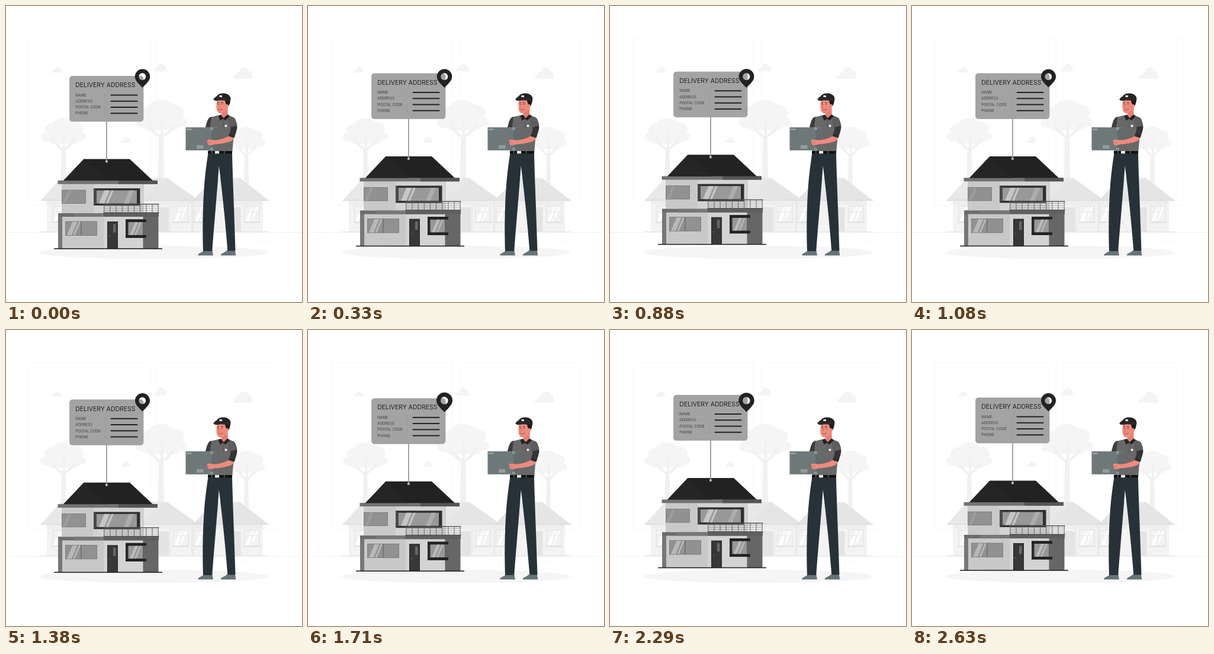
Write an HTML page that moves like this. It is 500 px wide and 500 px high and loops after 2680 ms.

```html
<!DOCTYPE html>
<html lang="en">
<head>
<meta charset="utf-8">
<title>Delivery address</title>
<style>
html, body { margin: 0; width: 100%; height: 100%; overflow: hidden; background: #fff; }
svg { display: block; width: 100%; height: 100%; }
text { font-family: Inter, "Open Sans", sans-serif; fill: #222; }
.label { font-size: 6.2px; font-weight: 300; }
</style>
</head>
<body>
<svg id="stage" viewBox="0 0 500 500"></svg>
<script>
const LOOP = 2680, FRAME = 1000 / 24, LAST = 63;
const PERIOD = 1500, LEAD = 38, LIFT = 10, SWELL = 0.1;
const PIN_X = 230.5, PIN_Y = 122.2;

const rect = (x, y, w, h, fill, more = '') =>
  `<rect x="${x}" y="${y}" width="${w}" height="${h}" fill="${fill}" ${more}/>`;
const path = (d, fill, more = '') => `<path d="${d}" fill="${fill}" ${more}/>`;
const line = (d, color, width, more = '') =>
  path(d, 'none', `stroke="${color}" stroke-width="${width}" ${more}`);
const dot = (x, y, r, fill) => `<circle cx="${x}" cy="${y}" r="${r}" fill="${fill}"/>`;
const round = 'stroke-linecap="round" stroke-linejoin="round"';

// Slanted reflection on a glass pane
const shine = (x, y, w, h, fill = '#c6c6c6') =>
  path(`M${x} ${y + h}l${h * 0.42} ${-h}h${w}l${-h * 0.42} ${h}z`, fill);

function cloud(x, y, w, h) {
  const p = (u, v) => `${(x + u * w).toFixed(1)} ${(y + v * h).toFixed(1)}`;
  return path(`M${p(.05, 1)}C${p(-.04, .9)} ${p(.02, .6)} ${p(.2, .65)}` +
    `C${p(.18, .4)} ${p(.28, .38)} ${p(.34, .42)}C${p(.34, -.1)} ${p(.76, -.1)} ${p(.8, .35)}` +
    `C${p(.95, .3)} ${p(1.02, .55)} ${p(.94, .66)}C${p(1.04, .7)} ${p(1.02, 1)} ${p(.92, 1)}Z`, '#f4f4f4');
}

// Crown from overlapping blobs around a forked trunk
function tree(cx, top, w, h, foot, trunk) {
  const blobs = [[0, .32, .27], [-.22, .43, .2], [.22, .4, .22], [-.36, .7, .14],
    [.37, .68, .13], [-.17, .72, .2], [.18, .72, .2], [0, .7, .2]];
  const crown = blobs.map(([u, v, r]) =>
    `<ellipse cx="${cx + u * w}" cy="${top + v * h}" rx="${r * w}" ry="${Math.min(r * w * .72, h * .34)}" fill="#f5f5f5"/>`).join('');
  const fork = top + h;
  return crown + path(`M${cx - trunk} ${foot}L${cx - trunk * .7} ${fork + 4}L${cx + trunk * .7} ${fork + 4}L${cx + trunk} ${foot}Z`, '#f1f1f1') +
    line(`M${cx - w * .24} ${fork - h * .27}Q${cx - w * .2} ${fork - 2} ${cx - 1} ${fork + 8}` +
      `M${cx + w * .25} ${fork - h * .25}Q${cx + w * .2} ${fork - 2} ${cx + 1} ${fork + 8}` +
      `M${cx + 1} ${fork + 8}V${fork - h * .42}`, '#f1f1f1', trunk * .75, 'stroke-linecap="round"');
}

function paleWindow(x, w) {
  return rect(x, 337, w, 29, '#e6e6e6') + rect(x + 1.5, 338.5, w - 3, 25.5, '#f2f2f2') +
    shine(x + 2, 339, w * .2, 25, '#fff') + shine(x + w * .38, 339, w * .13, 25, '#fff') +
    line(`M${x + w / 2} 338v26M${x} 347.5h${w}`, '#e9e9e9', 1) + rect(x - 1, 364.5, w + 2, 2, '#e2e2e2');
}

function backdrop() {
  const frame = x => `<rect x="${x}" y="55" width="204" height="282" rx="2" fill="none" stroke="#f5f5f5" stroke-width=".7"/>`;
  const dashes = [[416.8, 398.5, 33], [322.5, 401.2, 8.7], [396.6, 389.2, 19.2],
    [52.5, 390.9, 43], [104.6, 390.9, 6.3], [131.5, 395.1, 94]];
  return frame(39) + frame(255) +
    rect(0, 382, 500, .6, '#eaeaea') +
    dashes.map(([x, y, w]) => rect(x, y, w, .3, '#ebebeb')).join('') +
    cloud(77, 103, 17, 9.5) + cloud(250, 97, 22, 13.5) + cloud(383, 103, 33, 20) + cloud(194, 221, 16, 10) +
    tree(97, 190, 77, 45, 320, 5) + tree(262, 158, 88, 56, 320, 5.5) + tree(406, 203, 64, 42, 320, 4.5);
}

function paleHouses() {
  return rect(69, 329, 365, 53, '#f3f3f3') +
    path('M59 328L93 290.5H272L325 328Z', '#e8e8e8') + path('M228 328L272 290.5L325 328Z', '#e5e5e5') +
    path('M316 328L352 290.5H395L443 328Z', '#e8e8e8') + path('M352 328L395 290.5L443 328Z', '#e5e5e5') +
    path('M316 328L352 290.5L338 328Z', '#e4e4e4') +
    rect(59, 327, 385, 2.2, '#dedede') + rect(69, 329.2, 365, 7, '#eeeeee') +
    rect(276, 330, 3, 52, '#ededed') + rect(313, 330, 3, 52, '#e9e9e9') +
    rect(257, 340, 18.5, 42, '#e4e4e4') + rect(379, 340, 17.5, 42, '#e4e4e4') +
    paleWindow(78, 26) + paleWindow(282, 27) + paleWindow(317, 27) + paleWindow(402, 27) +
    rect(57, 380.8, 387, 1.4, '#e6e6e6');
}

const pane = (x, y, w, h) => rect(x, y, w, h, '#919191', 'stroke="#6e6e6e" stroke-width=".7"');

function rail() {
  let posts = '';
  for (let x = 165.8; x < 258; x += 10.15) posts += `M${x.toFixed(1)} 335V349.5`;
  return line(posts, '#555', .9) + line('M165 338.2H258M165 341.8H258M165 345.4H258', '#777', .6) +
    rect(164.5, 334, 94, 1.5, '#555') + rect(164.5, 348.4, 94, 1.8, '#555');
}

function house() {
  const roof = path('M97 295L131.5 258.5H209L248 295Z', '#222') +
    path('M131.5 258.5L137 264L172 295H97Z', '#252525');
  const upper = rect(94, 300, 138, 51, '#d3d3d3') + rect(94, 300, 54, 51, '#c9c9c9') +
    rect(231.5, 300, 1, 50, '#bdbdbd') +
    rect(87.5, 294.8, 168.5, 6, '#727272') + rect(190, 294.8, 66, 6, '#555') +
    pane(94.5, 311, 40, 22.5) + shine(96, 311.4, 5, 21.7, '#9c9c9c') +
    rect(148, 308, 78.5, 29, '#303030') + path('M148 308L153 311V333.5L148 337Z', '#4a4a4a') +
    rect(153, 311.5, 68, 22, '#999') +
    shine(157, 311.5, 9, 22) + shine(169, 311.5, 3.5, 22) + shine(199, 311.5, 8, 22, '#adadad');
  const lower = rect(94, 355, 139, 55, '#c8c8c8') + rect(165, 355, 68, 55, '#d3d3d3') +
    rect(88, 350, 7, 60, '#777') + rect(231.5, 355, 26, 55, '#666') +
    rect(88, 350, 170, 6, '#6c6c6c') + rect(115, 350, 50, 6, '#777') + rect(165, 350, 93, 6, '#5f5f5f') +
    pane(100.5, 364, 26.5, 23.5) + pane(127, 364, 26.5, 23.5) +
    shine(103, 364.5, 8, 22.5, '#b8b8b8') + shine(113.5, 364.5, 3, 22.5, '#b8b8b8') +
    line('M127 364V387.5', '#6a6a6a', .8) +
    rect(171, 364, 18, 46, '#303030') + rect(172.8, 366, 14.4, 44, '#383838') +
    rect(181, 368.5, 4.5, 14, '#686868') + dot(174.8, 389, .8, '#888') +
    rect(202, 360.5, 30, 31, '#2b2b2b') + rect(206.5, 365, 25, 22, '#989898') +
    shine(209, 365, 5, 22, '#bbb') + shine(217, 365, 2.5, 22, '#bbb') +
    rect(202, 360.5, 35, 4.5, '#222') + rect(202, 387, 35, 4.5, '#222') +
    rect(81, 409.2, 183, 1.6, '#222');
  return upper + roof + lower + rail();
}

function card() {
  const rows = ['NAME', 'ADDRESS', 'POSTAL CODE', 'PHONE'].map((label, i) => {
    const y = 150.5 + i * 10.25;
    return `<text class="label" x="117.3" y="${y + 2.2}">${label}</text>` +
      `<text class="label" x="167" y="${y + 2}">:</text>` +
      line(`M177.5 ${y}H221.5`, '#222', 2, round);
  }).join('');
  return line('M169.9 194V262', '#999', 1.8) + dot(169.9, 262.5, 2.3, '#999') + dot(169.9, 262.5, 1.5, '#bbb') +
    rect(107.5, 118.5, 124.5, 76.5, '#a3a3a3', 'rx="4.5" stroke="#949494" stroke-width=".6"') +
    '<text x="117.3" y="137.2" font-size="10.45">DELIVERY ADDRESS</text>' + rows;
}

// The hole stays open so the card shows through it
const pin = () => path('M230.5 106.8a12.5 12.5 0 0 1 12.5 12.5c0 4.9-3.1 8.5-6.2 11.9l-6.3 6.4' +
  'l-6.3-6.4c-3.1-3.4-6.2-7-6.2-11.9a12.5 12.5 0 0 1 12.5-12.5z' +
  'M230.3 113.5a5.9 5.9 0 1 0 0 11.8a5.9 5.9 0 1 0 0-11.8z', '#222', 'id="pin" fill-rule="evenodd"');

function courier() {
  const skin = '#ee8a7c', dark = '#242424', navy = '#263238', shoe = '#647478';
  const legs =
    path('M324.5 420.5C325 417 331 417 334 413H348.5L349.8 420.5Z', shoe) +
    path('M363 420.5C363.5 417 370 417 373 413H387L388.2 420.5Z', shoe) +
    line('M324.3 420.8H350M362.8 420.8H388.4', '#465458', 1) +
    path('M341.5 248H382C382.5 275 384 310 385 340L387.5 413.5H374.3C371 370 366 320 359.7 270' +
      'C357 310 352 365 348.3 414H333C331.8 380 332.3 340 334.5 310C336 285 339 265 341.5 248Z', navy);
  const torso =
    path('M347 187C341 188 339 196 336.5 207L349 211L352 190Z', '#3c3c3c') +
    path('M347 187.5L359 184.5H376L385 188.5C388 200 384.5 215 382.5 246H341.5C344 230 344 205 347 187.5Z', '#686868') +
    path('M364.5 172L374.5 170V185C372 190 367 190 363.5 186Z', '#e67f71') +
    path('M358.5 185.5L363 183.5L367.5 189.5L374.5 183L378 186.5L370.5 193.5L366.8 190.5L361.5 193.5Z', dark) +
    line('M366.8 192V206', '#4d4d4d', .6) + dot(371.5, 202.5, 2, '#f5f5f5') +
    rect(341, 245, 41, 4.3, '#111') + rect(353, 245, 7, 4.3, '#eee') +
    rect(347, 245, 1.4, 4.3, '#686868') + rect(368, 245, 1.4, 4.3, '#686868');
  const head =
    path('M356.3 159C355.3 165 355 170 355.8 174.5C356.6 179.5 360 182 364 181.2C369 180 373 176 374 170L374.5 159Z', skin) +
    path('M370 159H378.2C378.8 163 377.8 166.5 375.6 169.5L372.8 167L371 164Z', '#1b1b1b') +
    `<ellipse cx="373.8" cy="168.7" rx="2.2" ry="2.8" fill="${skin}"/>` +
    path('M350.3 158C351.5 155.5 353.5 153.5 356 152.5C358 148.5 364 147 370 147.8C376 148.8 379.5 152.5 379.5 157' +
      'L378.6 162.5C373 159.5 365 158.7 359 159.7C355 160.4 351.5 160 350.3 158Z', dark) +
    line('M351.5 158C358 156.5 370 156 378.5 158.8', '#484848', .5) + rect(360.5, 151, 4.5, 3, '#f5f5f5') +
    dot(358.8, 166, .75, '#222') + dot(364.8, 166, .75, '#222') +
    line('M357.2 163.6L359.4 163.2M363.3 163.1L366.3 163.6', '#222', .8, round) +
    line('M360.8 166.5L359 171L361 171.3', '#cf6458', .7, round) +
    line('M359 174.5C361 176.2 364 175.7 365.8 173.8', '#8b3f38', .8, round);
  const box =
    rect(303.5, 205, 54.5, 38.8, '#6f7879') + rect(347, 205, 11, 38.8, '#626b6d') +
    line('M303.5 205.3H358', '#7f8889', .6) +
    rect(345, 205, 4.8, 4.5, '#8d9798') + rect(345, 239.5, 4.8, 4.3, '#8d9798') +
    rect(305, 207, 8.5, 3, '#959e9f') + rect(322, 235, 11.5, 6, '#939c9d');
  const arm =
    path('M376.5 219.5L385 222C384 226 381 228.5 377 229.5C368 232 360 233.3 352 233.5C348 235.3 342.5 235.8 340.8 233.5' +
      'L339.5 227C340.5 225.3 347 225.3 350.5 226.8C358 226.5 368 224.5 376.5 219.5Z', skin) +
    line('M340.5 229.5H346M341 232H346.5', '#d56d61', .6, round) +
    path('M376 191C379 187.5 384 187.5 386.5 190C389.5 196 391 203 390.3 207C389 213 387 218.5 385.5 223' +
      'L376 220C377.5 215 379.5 210 379.5 207C378 202 376 197 376 191Z', '#343434') +
    path('M376 191C379 187.5 384 187.5 386.5 190C388.5 194 389.8 198 390.3 202L379 205C377.5 200 376 196 376 191Z', '#5e5e5e') +
    line('M377 217.5L386.3 220.3', '#1e1e1e', .8);
  return legs + torso + head + box + arm;
}

document.getElementById('stage').innerHTML = backdrop() + paleHouses() +
  '<ellipse cx="250" cy="416.2" rx="193.9" ry="11.3" fill="#f5f5f5"/>' +
  `<g id="float">${house()}${card()}</g>` + pin() + courier();

const floatEl = document.getElementById('float');
const pinEl = document.getElementById('pin');

// Two beats, at 14% and 42% of the period, then a rest
function beat(p) {
  if (p < .28) return 1 - Math.abs(p - .14) / .14;
  if (p < .42) return (p - .28) / .14;
  return Math.max(0, (.7 - p) / .28);
}

// Linear rise and fall, shown in 24 steps a second
function draw(ms) {
  const k = Math.min(LAST, Math.floor((ms % LOOP + 5) / FRAME));
  const phase = (k * FRAME + LEAD) % PERIOD / PERIOD;
  const lift = LIFT * (1 - Math.abs(1 - 2 * phase));
  const size = 1 + SWELL * beat(phase);
  floatEl.setAttribute('transform', `translate(0 ${(0.5 - lift).toFixed(3)})`);
  pinEl.setAttribute('transform',
    `translate(${PIN_X} ${PIN_Y}) scale(${size.toFixed(4)}) translate(${-PIN_X} ${-PIN_Y})`);
}

let start;
function tick(now) {
  start ??= now;
  draw(now - start);
  requestAnimationFrame(tick);
}
draw(0);
requestAnimationFrame(tick);
</script>
</body>
</html>
```
